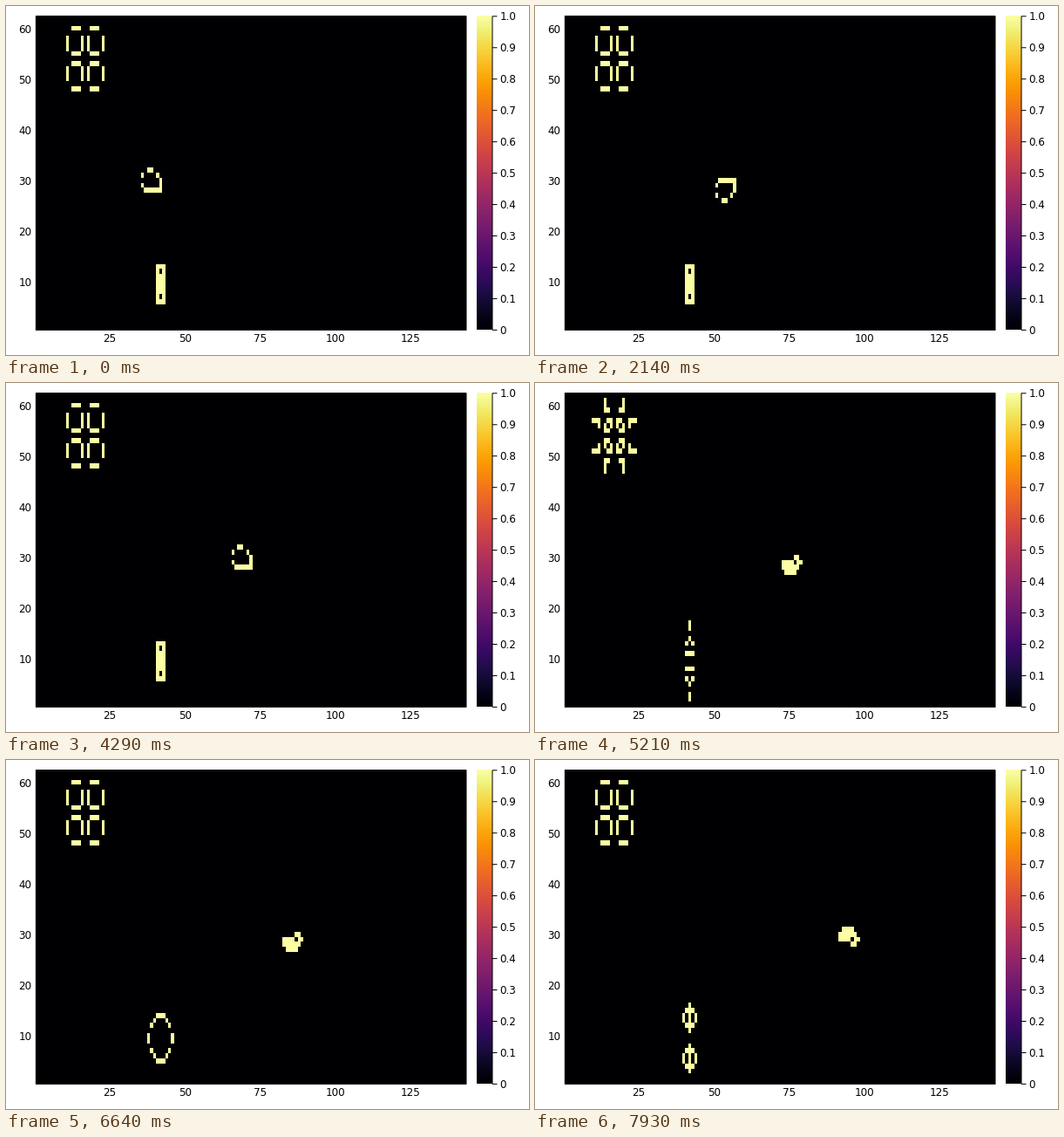
These frames come from a looping animation (600 px wide and 400 px high, 8 s). A matplotlib script:

```python
import numpy as np
import matplotlib.pyplot as plt
from matplotlib.animation import FuncAnimation

W, H, DPI = 600, 400, 100
ROWS, COLS = 62, 143
LEFT, RIGHT, TOP, BOTTOM = 34.4, 528, 11.8, 371.4
BAR_L, BAR_R = 540, 558
LOOP, TICK = 8000, 20  # ms
RATE = 14              # generations per second

PULSAR_HALF = ["..OOO...OOO..",
               ".............",
               "O....O.O....O",
               "O....O.O....O",
               "O....O.O....O",
               "..OOO...OOO.."]
PULSAR = PULSAR_HALF + ["............."] + PULSAR_HALF[::-1]
COLUMN = ["OOO", "O.O", "OOO", "OOO", "OOO", "OOO", "O.O", "OOO"]
SHIP = ["..OO...",
        "O....O.",
        "......O",
        "O.....O",
        ".OOOOOO"]


def place(grid, pattern, row, col):
    cells = np.array([[c == "O" for c in line] for line in pattern], dtype=int)
    h, w = cells.shape
    grid[row:row + h, col:col + w] = cells


def step(grid):
    """One generation of the Game of Life on a wrapped grid."""
    near = sum(np.roll(grid, (dy, dx), (0, 1))
               for dy in (-1, 0, 1) for dx in (-1, 0, 1) if dy or dx)
    return ((near == 3) | ((grid == 1) & (near == 2))).astype(int)


def history():
    grid = np.zeros((ROWS, COLS), dtype=int)
    place(grid, PULSAR, 2, 10)
    place(grid, SHIP, 30, 35)
    place(grid, COLUMN, 49, 40)
    states = [grid]
    while len(states) < LOOP * RATE // 1000:
        states.append(step(states[-1]))
    return states


states = history()

fig = plt.figure(figsize=(W / DPI, H / DPI), dpi=DPI, facecolor="white")
ax = fig.add_axes([0, 0, 1, 1])
px = 72 / DPI  # points per pixel


def label(x, y, text, ha):
    ax.text(x, y, text, ha=ha, va="baseline", color="black",
            family="DejaVu Sans", size=12 * px)


def line(xs, ys):
    ax.plot(xs, ys, color="black", lw=px, solid_capstyle="butt", snap=False)


style = dict(cmap="inferno", vmin=0, vmax=1, aspect="auto",
             interpolation="nearest")
board = ax.imshow(states[0], extent=(LEFT, RIGHT, BOTTOM, TOP), **style)
ax.imshow(np.linspace(1, 0, 256)[:, None],
          extent=(BAR_L, BAR_R, BOTTOM, TOP), **style)

line([LEFT, LEFT, RIGHT, RIGHT, LEFT], [TOP, BOTTOM, BOTTOM, TOP, TOP])
line([BAR_R, BAR_R], [TOP, BOTTOM])

for x in range(25, 126, 25):
    label(LEFT + (x - .5) * (RIGHT - LEFT) / COLS, 385, str(x), "center")
for y in range(10, 61, 10):
    label(29.5, BOTTOM - (y - .5) * (BOTTOM - TOP) / ROWS + 4.6, str(y), "right")
for k in range(11):
    y = BOTTOM - k / 10 * (BOTTOM - TOP)
    line([BAR_R, BAR_R + 5.5], [y, y])
    label(566.5, y + 4.4, f"{k / 10:.1f}" if k else "0", "left")

ax.set_xlim(0, W)
ax.set_ylim(H, 0)
ax.axis("off")


def draw(i):
    # each tick shows the generation current at three quarters of its span
    board.set_data(states[int((i + .75) * TICK * RATE / 1000)])
    return [board]


anim = FuncAnimation(fig, draw, frames=LOOP // TICK, interval=TICK,
                     repeat=True, repeat_delay=0)
plt.show()
```
